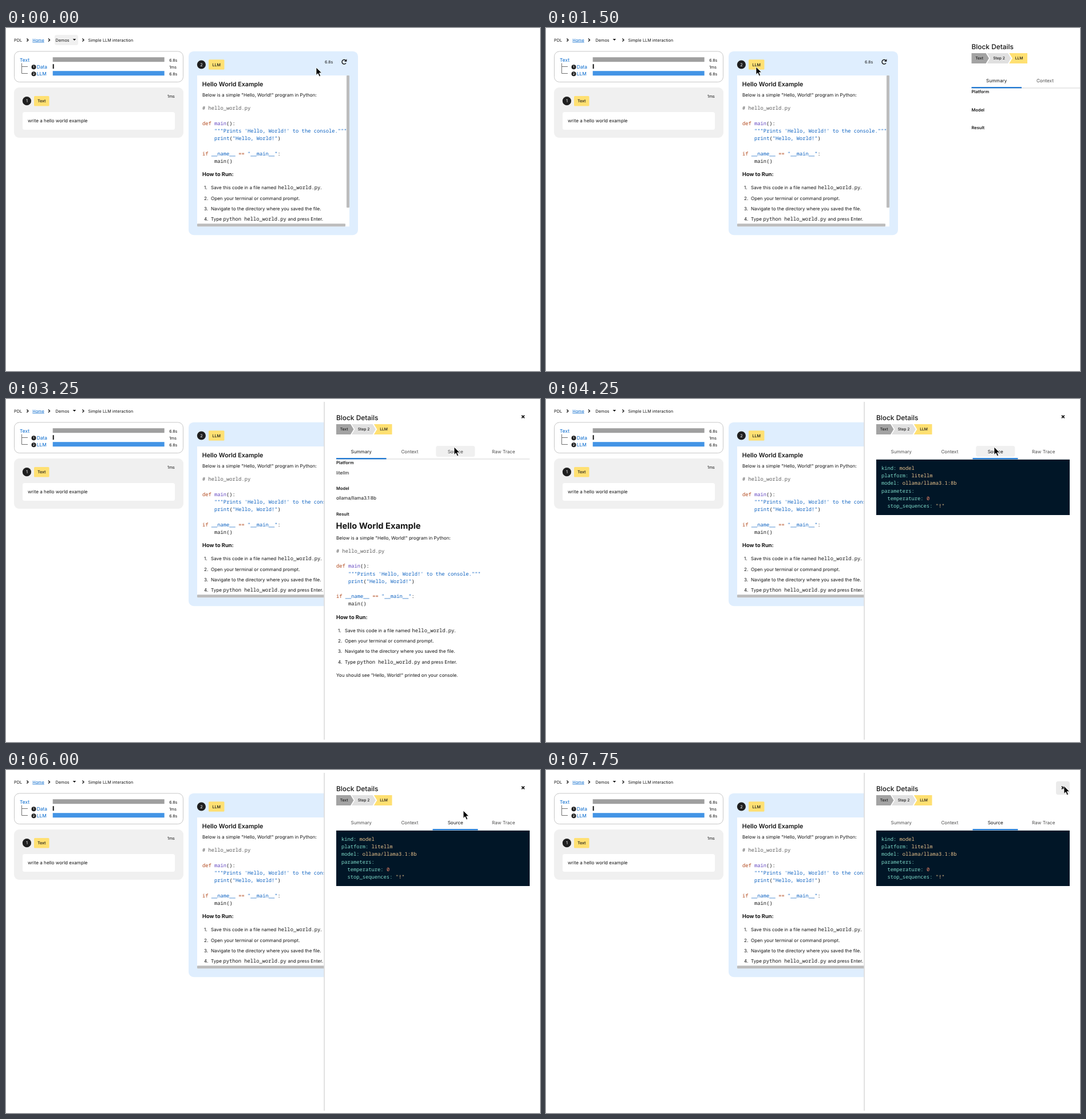
These frames come from a looping animation (933 by 600 pixels, 8000 ms). An HTML page:

```html
<!DOCTYPE html>
<html lang="en">
<head>
<meta charset="utf-8">
<title>Block details demo</title>
<style>
  html, body { margin: 0; width: 100%; height: 100%; overflow: hidden; background: #fff; }
  svg { display: block; width: 933px; height: 600px; }
  text { font: 8.1px Inter, sans-serif; fill: #151515; white-space: pre; text-rendering: geometricPrecision; }
  .crumb { font-size: 7.3px; }
  .small { font-size: 7.1px; }
  .tag { font-size: 7.1px; font-weight: 500; text-anchor: middle; }
  .step { font-size: 6.7px; font-weight: 500; text-anchor: middle; }
  .tree { font-size: 8.4px; fill: #06c; }
  .num { font-size: 7.4px; fill: #fff; text-anchor: middle; }
  .tiny { font-size: 5.4px; font-weight: 600; }
  .label { font-size: 7.5px; font-weight: 600; }
  .tab { text-anchor: middle; fill: #4d4d4d; }
  .tab.on { fill: #151515; }
  .code, .code tspan { font-family: "Noto Sans Mono", "DejaVu Sans Mono", monospace; font-size: 8.78px; }
  .c { fill: #5c5c5c; }
  .k { fill: #b1481c; }
  .f { fill: #5e40be; }
  .s { fill: #0a60c0; }
  .yaml { fill: #7fdbca; }
  .v { fill: #ecc48d; }
  .n { fill: #f78c6c; }
</style>
</head>
<body>
<svg viewBox="0 0 933 600">
  <defs>
    <path id="chevron" d="M-1.3-2.4 1.2 0-1.3 2.4" fill="none" stroke="#151515" stroke-width="1.4"/>
    <g id="doc">
      <text x="343" y="120">Below is a simple "Hello, World!" program in Python:</text>
      <text class="code c" x="343" y="143.4"># hello_world.py</text>
      <text class="code" x="343" y="169.8"><tspan class="k">def</tspan> <tspan class="f">main</tspan>():</text>
      <text class="code s" x="364.1" y="183">"""Prints 'Hello, World!' to the console."""</text>
      <text class="code" x="364.1" y="196.2"><tspan class="s">print</tspan>(<tspan class="s">"Hello, World!"</tspan>)</text>
      <text class="code" x="343" y="222.6"><tspan class="k">if</tspan> <tspan class="s">__name__</tspan> <tspan class="k">==</tspan> <tspan class="s">"__main__"</tspan>:</text>
      <text class="code" x="364.1" y="235.8">main()</text>
      <text x="343" y="259.3" style="font-size:9.3px;font-weight:700">How to Run:</text>
      <text x="346" y="282.4">1.</text>
      <text x="358" y="282.4">Save this code in a file named</text>
      <text x="475.6" y="282.4"><tspan class="code">hello_world.py</tspan>.</text>
      <text x="346" y="300.6">2.</text>
      <text x="358" y="300.6">Open your terminal or command prompt.</text>
      <text x="346" y="318.9">3.</text>
      <text x="358" y="318.9">Navigate to the directory where you saved the file.</text>
      <text x="346" y="337.2">4.</text>
      <text x="358" y="337.2">Type</text>
      <text class="code" x="379.4" y="337.2">python hello_world.py</text>
      <text x="492.4" y="337.2">and press Enter.</text>
    </g>
  </defs>

  <rect width="933" height="600" fill="#fff"/>

  <!-- Breadcrumb -->
  <rect id="demosHover" x="85" y="12" width="41" height="18" rx="3.5" fill="#f0f0f0"/>
  <text class="crumb" x="14" y="23.6">PDL</text>
  <text class="crumb" x="46.3" y="23.6" style="fill:#06c;text-decoration:underline">Home</text>
  <text class="crumb" x="86.5" y="23.6">Demos</text>
  <text class="crumb" x="143.5" y="23.6">Simple LLM interaction</text>
  <path d="M116.7 19h5.6l-2.8 3z" fill="#151515"/>
  <use href="#chevron" x="37.7" y="21"/>
  <use href="#chevron" x="75.3" y="21"/>
  <use href="#chevron" x="134.8" y="21"/>

  <!-- Timing tree -->
  <rect x="14.5" y="40.9" width="295" height="53.6" rx="9" fill="#fff" stroke="#c7c7c7"/>
  <path d="M27.5 61.5V79.5H38M27.5 67.5H38" fill="none" stroke="#707070"/>
  <text class="tree" x="24" y="59.4">Text</text>
  <text class="tree" x="53.8" y="71.2">Data</text>
  <text class="tree" x="53.8" y="83.2">LLM</text>
  <circle cx="48.5" cy="68.3" r="4" fill="#1f1f1f"/>
  <circle cx="48.5" cy="80.3" r="4" fill="#1f1f1f"/>
  <text class="num tiny" x="48.5" y="70.2">1</text>
  <text class="num tiny" x="48.5" y="82.2">2</text>
  <rect x="81.7" y="51.2" width="195" height="8" fill="#9f9f9f"/>
  <rect x="81.7" y="63.2" width="2" height="8" fill="#151515"/>
  <rect x="81.7" y="75.2" width="195" height="8" fill="#4394e5"/>
  <text class="small" x="285.2" y="59.2">6.8s</text>
  <text class="small" x="285.2" y="71.2">1ms</text>
  <text class="small" x="285.2" y="83.2">6.8s</text>

  <!-- Text block -->
  <rect x="14" y="104" width="296" height="88" rx="9" fill="#f0f0f0"/>
  <circle cx="36.4" cy="127.7" r="7.6" fill="#1f1f1f"/>
  <text class="num" x="36.4" y="130.4">1</text>
  <rect x="49" y="119" width="26.5" height="17.5" rx="1.5" fill="#ffe072"/>
  <text class="tag" x="62.2" y="130.2">Text</text>
  <text class="small" x="282" y="122.2">1ms</text>
  <rect x="29" y="147" width="266" height="31" rx="3.5" fill="#fff"/>
  <text x="38" y="164.5">write a hello world example</text>

  <!-- LLM block -->
  <rect x="319" y="40.7" width="296" height="321.5" rx="9" fill="#dfeefe"/>
  <circle cx="341.4" cy="64" r="7.6" fill="#1f1f1f"/>
  <text class="num" x="341.4" y="66.7">2</text>
  <rect x="354" y="55.3" width="27.5" height="17.5" rx="1.5" fill="#ffe072"/>
  <text class="tag" x="367.7" y="66.5">LLM</text>
  <text class="small" x="557" y="62.2">6.8s</text>
  <path d="M594 61.4A3.8 3.8 0 1 1 593.3 56.4" fill="none" stroke="#151515" stroke-width="1.4"/>
  <path d="M595.4 54.3V58.7H591z" fill="#151515"/>
  <rect x="334" y="83" width="266" height="264.3" fill="#fff"/>
  <text x="342.7" y="102.2" style="font-size:10.7px;font-weight:600">Hello World Example</text>
  <use href="#doc"/>
  <rect x="595" y="83" width="5" height="231.3" rx="1" fill="#bdbdbd"/>
  <rect x="334" y="342.2" width="259" height="5" rx="1" fill="#bdbdbd"/>

  <!-- Details panel -->
  <g id="panel">
    <rect id="edge" x="555.2" y="5" width="2" height="591" fill="#dedede"/>
    <rect x="557" width="376" height="600" fill="#fff"/>
    <text x="577" y="37.3" style="font-size:11.9px;font-weight:500">Block Details</text>
    <path d="M577 44H602L607.5 53 602 62H577z" fill="#a3a3a3"/>
    <path d="M604 44H640.5L646 53 640.5 62H604L609.5 53z" fill="#e0e0e0"/>
    <path d="M642.8 44H674.5V62H642.8L648.3 53z" fill="#ffe072"/>
    <text class="step" x="590.6" y="55.4">Text</text>
    <text class="step" x="625" y="55.4">Step 2</text>
    <text class="step" x="660" y="55.4">LLM</text>
    <rect id="closeHover" x="891" y="19.7" width="24" height="23.5" rx="4" fill="#ebebeb"/>
    <path d="M901 28.6 905.8 33.4M905.8 28.6 901 33.4" stroke="#151515" stroke-width="1.7"/>

    <rect id="tabHover" x="751.3" y="82" width="68" height="19" rx="3.5" fill="#f0f0f0"/>
    <text class="tab" x="620.7" y="94.6">Summary</text>
    <text class="tab" x="705.4" y="94.6">Context</text>
    <text class="tab" x="785.2" y="94.6">Source</text>
    <text class="tab" x="869.2" y="94.6">Raw Trace</text>
    <rect x="577" y="104.6" width="338" height=".8" fill="#c7c7c7"/>
    <rect id="underline" y="103.3" height="2" fill="#06c"/>

    <g id="loading">
      <text class="label" x="577" y="114">Platform</text>
      <text class="label" x="577" y="145.6">Model</text>
      <text class="label" x="577" y="177">Result</text>
    </g>
    <g id="summary">
      <text class="label" x="577" y="114">Platform</text>
      <text x="577" y="131.6">litellm</text>
      <text class="label" x="577" y="158.8">Model</text>
      <text x="577" y="176.4">ollama/llama3.1:8b</text>
      <text class="label" x="577" y="203.6">Result</text>
      <text x="576.5" y="226.8" style="font-size:14.7px;font-weight:700">Hello World Example</text>
      <use href="#doc" x="234" y="125.6"/>
      <text x="577" y="486">You should see "Hello, World!" printed on your console.</text>
    </g>
    <g id="source">
      <rect x="577" y="106" width="338" height="97" fill="#011627"/>
      <text class="code yaml" x="586" y="124">kind: <tspan class="v">model</tspan></text>
      <text class="code yaml" x="586" y="137.2">platform: <tspan class="v">litellm</tspan></text>
      <text class="code yaml" x="586" y="150.4">model: <tspan class="v">ollama/llama3.1:8b</tspan></text>
      <text class="code yaml" x="586" y="163.6">parameters:</text>
      <text class="code yaml" x="596.5" y="176.8">temperature: <tspan class="n">0</tspan></text>
      <text class="code yaml" x="596.5" y="190">stop_sequences: <tspan class="v">"!"</tspan></text>
    </g>
  </g>

  <path id="cursor" d="M0 0V13.4L3.1 10.6 5.3 15.7 7.6 14.7 5.4 9.7H9.6z" fill="#000" stroke="#fff" stroke-width=".8"/>
</svg>
<script>
  const LOOP = 8000, STEP = 250;
  const $ = id => document.getElementById(id);
  const show = (id, on) => $(id).setAttribute('display', on ? 'inline' : 'none');
  const tabs = document.querySelectorAll('.tab');

  // Pointer tip: time, x, y
  const path = [
    [0, 542, 69], [250, 525, 70], [500, 468, 72], [750, 405, 71], [1000, 374, 69], [1250, 367, 68],
    [2500, 367, 68], [2750, 470, 118], [3000, 715, 116], [3250, 783, 84],
    [5250, 783, 84], [5500, 785, 83], [6000, 799, 71], [6500, 866, 55],
    [7000, 905, 28], [8000, 905, 28]
  ];

  function pointer(t) {
    const i = path.findIndex(p => p[0] > t);
    const [t0, x0, y0] = path[i - 1], [t1, x1, y1] = path[i];
    const u = (t - t0) / (t1 - t0);
    return [x0 + (x1 - x0) * u, y0 + (y1 - y0) * u];
  }

  function draw(now) {
    const t = Math.floor(now % LOOP / STEP) * STEP;
    const [x, y] = pointer(t);
    const sliding = t < 1750, source = t >= 4250;

    $('cursor').setAttribute('transform', `translate(${x} ${y})`);
    $('panel').setAttribute('transform', `translate(${sliding ? 166.5 : 0})`);
    show('panel', t >= 1500);
    show('edge', !sliding);
    show('demosHover', t < 1500);
    show('loading', sliding);
    show('summary', !sliding && !source);
    show('source', source);
    show('tabHover', x > 751 && x < 819 && y > 82 && y < 101);
    show('closeHover', x > 891 && y < 43);

    $('underline').setAttribute('x', source ? 745.5 : 577);
    $('underline').setAttribute('width', source ? 79 : 87.5);
    tabs[0].classList.toggle('on', !source);
    tabs[2].classList.toggle('on', source);
    requestAnimationFrame(draw);
  }
  draw(0);
</script>
</body>
</html>
```
